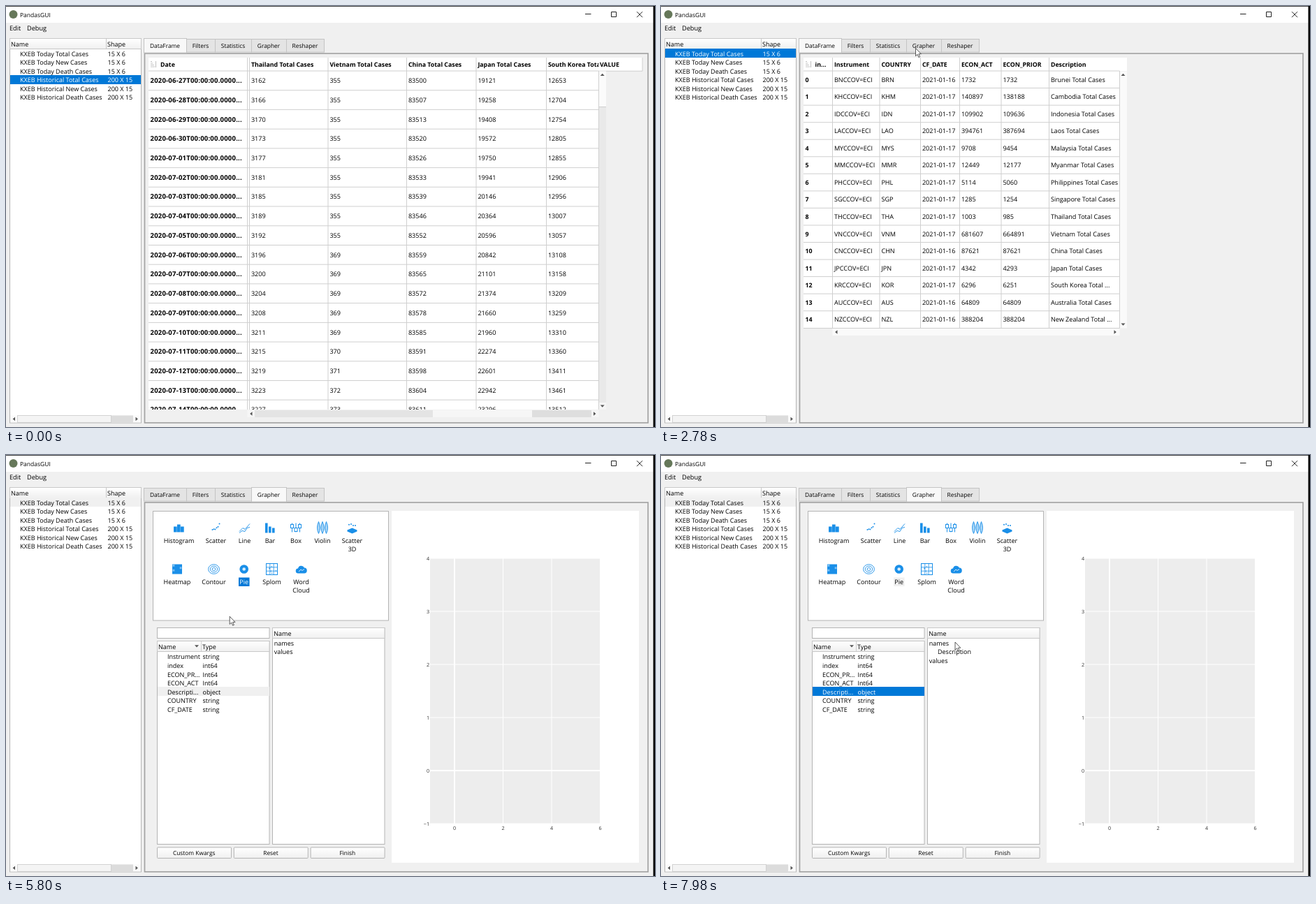
An HTML page for the animation above (8 s loop, 929 by 603 pixels).

```html
<!DOCTYPE html>
<html lang="en">
<head>
<meta charset="utf-8">
<title>PandasGUI</title>
<style>
  html, body { margin: 0; width: 100%; height: 100%; overflow: hidden; background: #f0f0f0; }
  svg { display: block; }
  text { font: 9px "Open Sans", "Noto Sans", sans-serif; text-rendering: geometricPrecision; white-space: pre; }
  .title { font-size: 8.5px; }
  .menu { font-size: 9.2px; }
  .ui { font-size: 8.4px; }
  .cell { font-size: 9.1px; }
  .head { font-size: 8.8px; font-weight: 700; }
  .date { font-size: 9.5px; font-weight: 700; letter-spacing: .22px; }
  .tick { font-size: 7.2px; fill: #333; }
  .row rect { shape-rendering: crispEdges; }
</style>
</head>
<body>
<svg id="stage" width="929" height="603" viewBox="0 0 929 603"></svg>
<script>
const LOOP = 8000, ROW = 12.55, FRAME = 78;
const BLUE = '#0078d7', PALE = '#f0f0f0', GRID = '#cfcfcf', EDGE = '#b4b4b4', ICON = '#1a8fe8';
const list = s => s.split(' ');
const range = n => [...Array(n).keys()];
const draw = (n, fn) => range(n).map(fn).join('');
const rand = n => { const v = Math.sin(n * 127.1) * 43758.5; return v - Math.floor(v); };

// Drawing helpers return SVG markup
const rect = (x, y, w, h, fill, stroke, extra = '') =>
  `<rect x="${x}" y="${y}" width="${w}" height="${h}" fill="${fill}"${stroke ? ` stroke="${stroke}"` : ''} ${extra}/>`;
const path = (d, fill = 'none', stroke = 'none', w = 1) =>
  `<path d="${d}" fill="${fill}" stroke="${stroke}" stroke-width="${w}"/>`;
const text = (x, y, s, cls = '', anchor = 'start', extra = '') =>
  `<text x="${x}" y="${y}" class="${cls}" text-anchor="${anchor}" ${extra}>${s}</text>`;
const mid = (x, y, s, cls) => text(x, y, s, cls, 'middle');
const dot = (x, y, r, fill = ICON) => `<circle cx="${x}" cy="${y}" r="${r}" fill="${fill}"/>`;
const group = (id, body, extra = '') => `<g id="${id}" ${extra}>${body}</g>`;
const hLine = (x1, x2, y, c = GRID, w = 1) => path(`M${x1} ${y}H${x2}`, 'none', c, w);
const vLine = (x, y1, y2, c = GRID, w = 1) => path(`M${x} ${y1}V${y2}`, 'none', c, w);

const ARROWS = { l: 'm2-2.8v5.6l-3.4-2.8z', r: 'm-2-2.8v5.6l3.4-2.8z', u: 'm-3 1.5h6l-3-3.2z', d: 'm-3-1.5h6l-3 3.2z' };
const arrow = (dir, x, y) => path(`M${x} ${y}${ARROWS[dir]}`, '#555');

const defs = `<defs>
  <linearGradient id="bar" x2="0" y2="1"><stop stop-color="#fff"/><stop offset="1" stop-color="#f0f0f0"/></linearGradient>
  <radialGradient id="glow"><stop offset=".75" stop-color="#ffb932" stop-opacity=".72"/>
  <stop offset="1" stop-color="#ffb932" stop-opacity=".1"/></radialGradient>
  <clipPath id="tableClip">${rect(204, 74, 644.5, 504, '#000')}</clipPath></defs>`;

function frame() {
  return rect(0, 0, 929, 603, PALE) + rect(0, 0, 927, 24, '#fff') + rect(0, 0, 929, 1, '#444') +
    rect(926.5, 0, 2.5, 603, '#000') + dot(10.5, 12, 6, '#66785a') + text(20, 15.6, 'PandasGUI', 'title') +
    path('M829 11.5H837.5M866.5 8.5h7v7h-7zM903 8.2l8 8M911 8.2l-8 8', 'none', '#222') +
    text(5, 35.3, 'Edit', 'menu') + text(30, 35.3, 'Debug', 'menu');
}

// White list box with a header strip
const listBox = (x, y, w, h) => rect(x, y, w, h, '#fff', EDGE) + rect(x, y, w, 15, 'url(#bar)', '#c8c8c8');

function sidebar() {
  const kinds = ['Total', 'New', 'Death'];
  const rows = draw(6, i => {
    const y = 61.4 + i * ROW, name = `KXEB ${i < 3 ? 'Today' : 'Historical'} ${kinds[i % 3]} Cases`;
    return `<g class="set row">${rect(6, y, 187, 13, 'none')}${text(20, y + 10.3, name)}${
      text(145.5, y + 10.3, i < 3 ? '15 X 6' : '200 X 15')}</g>`;
  });
  return listBox(5.5, 46.5, 188, 550.5) + vLine(143.5, 47, 61, '#c8c8c8') +
    text(7, 58, 'Name') + text(145, 58, 'Shape') + rows +
    rect(6, 586.5, 187, 10, '#fafafa') + rect(16.5, 586.5, 134, 10, '#f4f4f4', '#d2d2d2') +
    rect(151, 586.5, 31, 10, '#dcdcdc') + arrow('l', 11, 591.5) + arrow('r', 187.5, 591.5);
}

const TABS = [['DataFrame', 197, 61], ['Filters', 258, 41], ['Statistics', 299, 52], ['Grapher', 351, 50], ['Reshaper', 401, 54]];
function tabs() {
  return rect(198.5, 68, 720.5, 529, PALE, '#a0a0a0', 'stroke-width="1.6"') +
    TABS.map(([name, x, w]) => `<g class="tab">${rect(x + .5, 47.5, w, 18.5, '#e4e4e4', '#c4c4c4')}${
      mid(x + w / 2, 60.2, name, 'ui')}</g>`).join('');
}

const sortIcon = draw(4, i => hLine(207, 209 + i * 1.4, 79.5 + i * 2.5, '#b0b0b0', .8)) + vLine(214.5, 79, 88, '#b0b0b0', .8);

// Each row starts with its index label
function table(xs, heads, rows, step, right, bottom, keyCls) {
  let out = rect(204, 74, right - 204, bottom - 74, '#fff') + sortIcon;
  xs.forEach((x, c) => { out += text(x + 2.4, 87, heads[c], 'head') + vLine(x, 74, bottom); });
  rows.forEach(([key, ...cells], r) => {
    const y = 93 + r * step, base = y + step / 2 + 3.3;
    out += hLine(204, right, y.toFixed(1)) + text(206.5, base, key, keyCls);
    cells.forEach((s, c) => { out += text(xs[c] + 2.4, base, s, 'cell'); });
  });
  return `<g clip-path="url(#tableClip)">${out}</g>` + vLine(right, 93, bottom);
}

// Daily totals follow smooth growth from the first day
const GROWTH = {
  Thailand: d => 3162 + 3.8 * d,
  Vietnam: d => d < 9 ? 355 : 369 + Math.max(0, d - 13),
  China: d => 83500 + 6.5 * d,
  Japan: d => 19121 + 130 * d + 6.8 * d * d,
  'South Korea': d => 12653 + 50.5 * d
};

function history() {
  const heads = Object.keys(GROWTH).map(n => n + ' Total Cases');
  const rows = range(18).map(d => [
    new Date(Date.UTC(2020, 5, 27 + d)).toISOString().slice(0, 10) + 'T00:00:00.0000...',
    ...Object.values(GROWTH).map(fn => Math.round(fn(d)))
  ]);
  return rect(848, 74, 63, 19, '#fff') + table([348.5, 461, 573.5, 673, 773.5], heads, rows, 27.72, 848.5, 578, 'date') +
    text(221, 87, 'Date', 'head') + text(850, 87, 'VALUE', 'head') +
    vLine(345.5, 74, 578) + path('M848 93.2H911V74', 'none', GRID) +
    rect(849, 93.5, 10, 484.5, '#e9e9e9') + rect(849, 93.5, 10, 51, '#fbfbfb') + hLine(849, 859, 144.5) +
    rect(849, 568, 10, 10, '#f6f6f6') + arrow('u', 853.7, 98.5) + arrow('d', 853.7, 573) +
    rect(345.5, 578.5, 503, 10.5, '#f6f6f6') + rect(356, 579, 255, 10, '#e4e4e4') +
    rect(753, 579, 85, 10, '#dedede') + arrow('l', 350.5, 584) + arrow('r', 843, 584);
}

const COUNTRIES = ['BN BRN Brunei', 'KH KHM Cambodia', 'ID IDN Indonesia', 'LA LAO Laos', 'MY MYS Malaysia',
  'MM MMR Myanmar', 'PH PHL Philippines', 'SG SGP Singapore', 'TH THA Thailand', 'VN VNM Vietnam', 'CN CHN China',
  'JP JPN Japan', 'KR KOR South Korea', 'AU AUS Australia', 'NZ NZL New Zealand'];

function today() {
  const heads = list('Instrument COUNTRY CF_DATE ECON_ACT ECON_PRIOR Description');
  const rows = COUNTRIES.map((row, i) => {
    const [code, iso, ...place] = list(row), steady = rand(i + 40) < .33;
    const total = Math.round(10 ** (2.2 + 3.7 * rand(i + 1)));
    return [i, code + 'CCOV=ECI', iso, '2021-01-' + (steady ? 16 : 17), total,
      steady ? total : Math.round(total * (1 - .03 * rand(i + 70))),
      place.join(' ') + ' Total ' + (place.length > 1 ? '...' : 'Cases')];
  });
  return rect(656, 74, 11, 19, '#fff') + table([245.5, 313, 371.5, 427.5, 487, 555.5], heads, rows, 24.55, 656.5, 461.5, 'head') +
    text(220.5, 87, 'in...', 'head') + hLine(204, 656.5, 461.5) +
    rect(657, 93.5, 10, 368, '#fafafa') + arrow('u', 661.5, 98.5) + arrow('d', 661.5, 456) +
    rect(245.5, 462, 411, 10, '#fafafa') + arrow('l', 250.5, 467) + arrow('r', 650.5, 467);
}

// Icons are drawn around their own centre
const ICONS = {
  Histogram: () => draw(3, i => rect(i * 5 - 7.5, i === 1 ? -5 : -2, 4.7, i === 1 ? 11 : 8, ICON)),
  Scatter: () => draw(6, i => dot(i * 2 - 5, 5 - i * 2.2 + 5 * (rand(i) - .5), 1)),
  Line: () => path('M-7.5 5l5-5 3 2 7-8M-7.5 7l4-3 4 1 3-5 4-1', 'none', ICON, .9),
  Bar: () => draw(3, i => rect(i * 5 - 7, [-7, -2, 0][i], 3.6, [14, 9, 7][i], ICON)),
  Box: () => draw(3, i => vLine(i * 5.5 - 5.5, -7, 6, ICON) + rect(i * 5.5 - 7.5, i % 2 ? 0 : -5, 4, 5, '#fff', ICON)),
  Violin: () => draw(3, i => path(`M${i * 5.5 - 5.5}-9q4 9 0 17q-4-8 0-17z`, '#a9d6f7', ICON, .9)),
  Scatter3D: () => path('M-7 3l7-3 7 3v2l-7 3-7-3z', ICON) + draw(4, i => dot(i * 3 - 4.5, -1 - 5 * rand(i + 3), 1)),
  Heatmap: () => rect(-7, -7, 14, 14, ICON) + draw(16, i =>
    rand(i + 1) < .35 ? rect(i % 4 * 3.4 - 6.5, (i >> 2) * 3.4 - 6.5, 2.8, 2.8, '#7cc2f5') : ''),
  Contour: () => draw(3, i =>
    `<ellipse rx="${2.5 + i * 2.7}" ry="${2 + i * 2.4}" fill="none" stroke="${ICON}" stroke-width=".9"/>`),
  Pie: () => dot(0, 0, 6.3) + dot(0, 0, 2.3, '#d8edfc'),
  Splom: () => rect(-8, -8, 16, 16, '#fff', ICON) +
    draw(2, i => vLine(i * 5.4 - 2.7, -8, 8, ICON, .8) + hLine(-8, 8, i * 5.4 - 2.7, ICON, .8)) +
    draw(6, i => dot(12 * rand(i + 5) - 6, 12 * rand(i + 9) - 6, .8)),
  Cloud: () => path('M-4 6a3.5 3.5 0 0 1-.5-7a4.8 4.8 0 0 1 9-1a4 4 0 0 1-.5 8z', ICON) +
    path('M-3.5 3.5l3-3 2 1.5 3-2', 'none', '#fff', .8)
};
const CHARTS = [
  [105, ['Histogram', 247.5], ['Scatter', 300.5], ['Line', 341.5], ['Bar', 378], ['Box', 415], ['Violin', 453],
    ['Scatter3D', 495.5, 'Scatter', '3D']],
  [164, ['Heatmap', 245], ['Contour', 297.5], ['Pie', 340.7], ['Splom', 380.5], ['Cloud', 422.5, 'Word', 'Cloud']]
];

function chartPicker() {
  let out = rect(210.5, 80.5, 337, 156.5, '#fff', EDGE) + rect(333, 175.5, 15.5, 12.5, PALE, '', 'id="pieBg"');
  for (const [y, ...charts] of CHARTS) {
    for (const [name, x, label = name, second = ''] of charts) {
      out += group('icon' + name, ICONS[name](), `transform="translate(${x} ${y - .5})"`) +
        text(x, y + 20.6, label, '', 'middle', `id="label${name}"`) + mid(x, y + 33.2, second);
    }
  }
  return out;
}

function plot() {
  return rect(552, 80, 354, 504, '#fff') + rect(607, 148, 243.5, 380, '#ededed') +
    draw(4, i => {
      const x = 642 + i * 69.5;
      return vLine(x, 148, 528, '#fff', i ? 1 : 1.8) + mid(x, 536.5, i * 2, 'tick');
    }) +
    draw(6, i => {
      const y = 528 - i * 76;
      return hLine(607, 850.5, y, '#fff', i === 1 ? 1.8 : 1) + text(606, y + 2.5, i ? i - 1 : '−1', 'tick', 'end');
    });
}

const FIELDS = ['Instrument string', 'index int64', 'ECON_PR... Int64', 'ECON_ACT Int64', 'Descripti... object',
  'COUNTRY string', 'CF_DATE string'];

function grapher() {
  let out = chartPicker() + rect(216.5, 247.5, 160.5, 15, '#fff', EDGE) + listBox(216.5, 266.5, 160.5, 291) +
    vLine(279.5, 267, 281) + text(218, 278, 'Name') + text(281, 278, 'Type') + arrow('d', 273, 273.7);
  FIELDS.forEach((s, i) => {
    const [name, type] = list(s), y = 282.2 + i * ROW;
    const row = text(231, y + 10.2, name) + text(281.5, y + 10.2, type);
    out += i === 4 ? group('field', rect(217, y, 160, 13, PALE) + row, 'class="row"') : row;
  });
  out += listBox(381.5, 247.5, 160.5, 310) + text(383.3, 258.6, 'Name') + text(383.8, 272.6, 'names') +
    text(396, 285.2, 'Description', '', 'start', 'id="dropped"') + text(383.8, 285.2, 'values', '', 'start', 'id="values"') +
    rect(382.5, 263.5, 159, 12, 'none', '#333', 'id="target"');
  list('Custom_Kwargs Reset Finish').forEach((s, i) => {
    const x = 216.5 + i * 109.8;
    out += rect(x, 562, 106, 15.5, 'url(#bar)', EDGE, 'rx="1"') + mid(x + 52.7, 573.2, s.replace('_', ' '), 'ui');
  });
  return out + plot();
}

const pointer = path('M0 0V11.2L2.6 8.8L4.4 13L6.2 12.2L4.4 8.2H7.8Z', '#fff', '#333', .8);
const stage = document.getElementById('stage');
stage.innerHTML = defs + frame() + sidebar() + tabs() + group('history', history()) + group('today', today()) +
  group('grapher', grapher()) + group('cursor', group('press', dot(0, 1, 8, 'url(#glow)')) + pointer);

const $ = id => document.getElementById(id);
const show = (id, on) => $(id).setAttribute('display', on ? 'inline' : 'none');
const paint = (row, bg, ink) => {
  row.firstElementChild.setAttribute('fill', bg);
  row.setAttribute('fill', ink);
};

// start, end, x, y, sideways bend; each move begins where the last one ended
const ORIGIN = [830, 148];
const MOVES = [
  [680, 1070, 29, 34, 0], [1150, 1300, 45, 73, 0], [1450, 1530, 47, 72, 0], [1700, 1780, 47, 66, 0],
  [2170, 2630, 358, 63, .03], [2780, 2870, 371, 58, 0], [4100, 4740, 342, 174, .3], [4880, 4880, 341, 168, 0],
  [5570, 6260, 260, 337, -.1], [6430, 6500, 259, 338, 0], [6900, 7450, 421, 268, .06]
];
const SHOW = 1850, OPEN = 3190, PICK = 5030, GRAB = 6730, DROP = 7980;
const PRESSES = [[SHOW, 1930], [OPEN, 3240], [PICK, 5110], [GRAB, DROP]];

const ease = p => p * p * (3 - 2 * p);
function cursorAt(t) {
  const i = MOVES.filter(m => t >= m[0]).length - 1;
  if (i < 0) return null;
  const [t0, t1, x1, y1, bend] = MOVES[i], [x0, y0] = i ? MOVES[i - 1].slice(2) : ORIGIN;
  const n = Math.round((t1 - t0) / FRAME) + 1;
  const k = t >= t1 ? n : 1 + Math.floor((t - t0) / (t1 - t0) * (n - 1));
  const p = ease(k / n), side = 2 * p * (1 - p) * bend, dx = x1 - x0, dy = y1 - y0;
  return [x0 + dx * p - dy * side, y0 + dy * p + dx * side];
}

const sets = document.querySelectorAll('.set'), tabEls = document.querySelectorAll('.tab');
function render(t) {
  const pos = cursorAt(t), dropped = t >= DROP;
  show('cursor', pos);
  if (pos) $('cursor').setAttribute('transform', `translate(${pos[0].toFixed(1)} ${pos[1].toFixed(1)})`);
  show('press', PRESSES.some(([a, b]) => t >= a && t < b));

  show('history', t < SHOW);
  show('today', t >= SHOW && t < OPEN);
  show('grapher', t >= OPEN);
  const tab = t < OPEN ? 0 : 3, chosen = t < SHOW ? 3 : 0, focused = t < PICK;
  tabEls.forEach((el, i) => {
    const box = el.firstElementChild, on = i === tab;
    box.setAttribute('fill', on ? '#f8f8f8' : '#e4e4e4');
    box.setAttribute('y', on ? 46.5 : 47.5);
    box.setAttribute('height', on ? 20.5 : 18.5);
  });
  sets.forEach((el, i) => {
    const on = i === chosen;
    paint(el, on ? (focused ? BLUE : PALE) : 'none', on && focused ? '#fff' : '#000');
  });

  const pieOn = t >= PICK && t < GRAB, fieldOn = t >= GRAB;
  $('pieBg').setAttribute('fill', pieOn ? BLUE : PALE);
  $('labelPie').setAttribute('fill', pieOn ? '#fff' : '#000');
  paint($('field'), fieldOn ? BLUE : PALE, fieldOn ? '#fff' : '#000');
  show('target', fieldOn && !dropped && pos[0] > 382 && pos[1] < 276);
  show('dropped', dropped);
  $('values').setAttribute('y', dropped ? 297.8 : 285.2);
}

const start = performance.now();
(function tick() {
  render((performance.now() - start) % LOOP);
  requestAnimationFrame(tick);
})();
</script>
</body>
</html>
```
